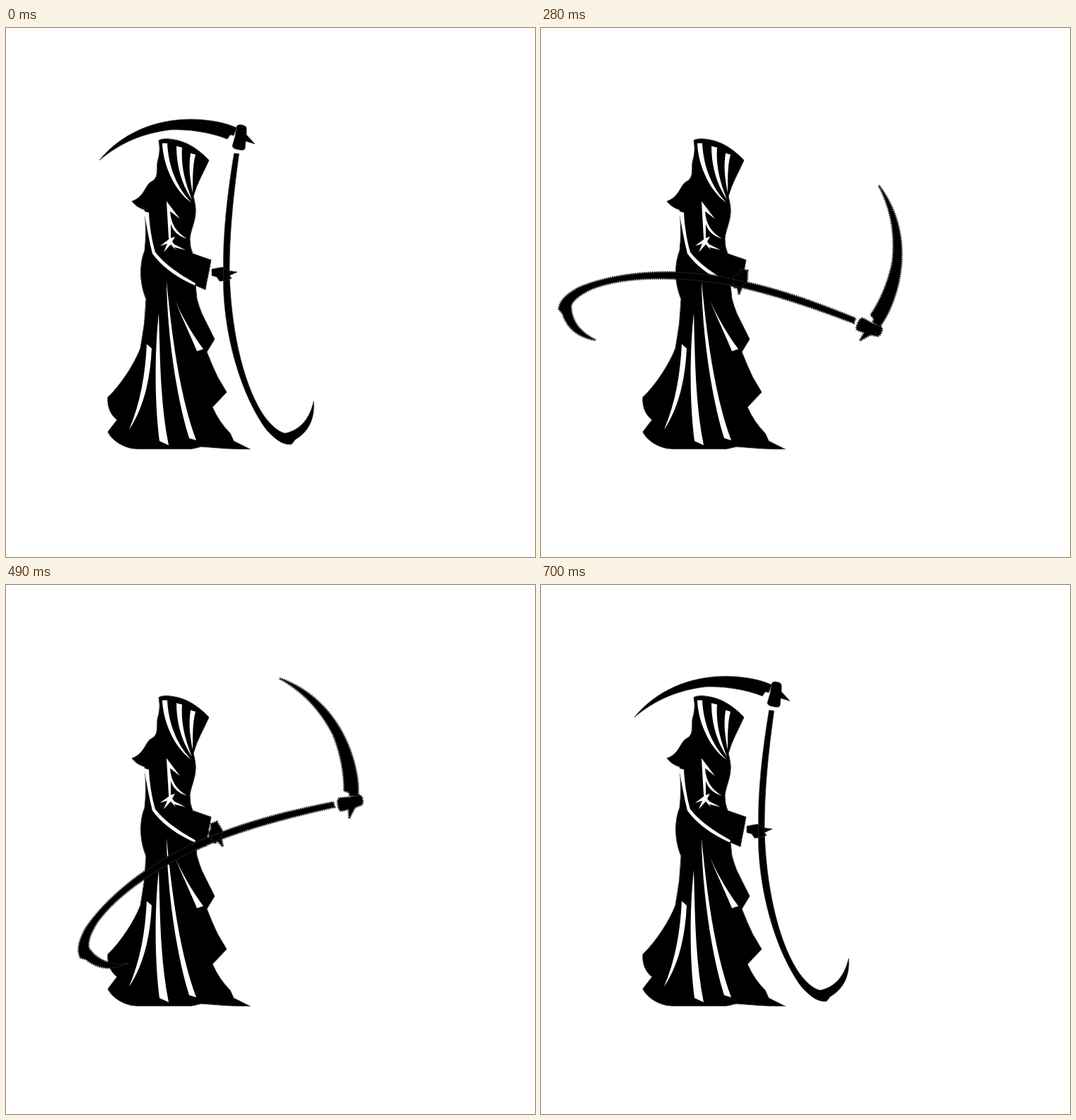
Recreate the animation shown at these times as an HTML page. Size 748 by 748 pixels, loop 770 ms.

```html
<!DOCTYPE html>
<html lang="en">
<head>
<meta charset="utf-8">
<title>Reaper swinging a scythe</title>
<style>
html, body { margin: 0; width: 100%; height: 100%; overflow: hidden; background: #fff; }
svg { display: block; width: 100vw; height: 100vh; }
.robe { stroke: #3a3a3a; stroke-width: 1; }
.folds { fill: #fff; }
.scythe {
  transform-origin: 283.5px 357.5px;
  stroke: #000;
  stroke-dasharray: 1.4 1.6;
  animation: swing 770ms step-end infinite;
}
.rim { fill: none; stroke: #333; stroke-width: .7; stroke-dasharray: none; }

/* the swing goes out in five steps and back through the same poses */
@keyframes swing {
  0%, 90.9%, 100% { transform: none; stroke-width: 0; }
  9.09%, 81.81% { transform: translate(-5.5px, -9px) rotate(23deg); stroke-width: 2; }
  18.18%, 72.72% { transform: translate(-4.5px, -16.5px) rotate(45deg); stroke-width: 2.5; }
  27.27%, 63.63% { transform: translate(-3.5px, -24px) rotate(69.6deg); stroke-width: 3; }
  36.36%, 54.54% { transform: translate(-6px, -25.5px) rotate(103deg); stroke-width: 3; }
  45.45% { transform: translate(-8px, -26.5px) rotate(136.1deg); stroke-width: 3.5; }
}
</style>
</head>
<body>
<svg viewBox="0 0 748 748">
  <defs>
    <clipPath id="ground"><rect width="748" height="595.5"/></clipPath>
    <g id="weapon">
      <!-- blade -->
      <path d="M132 187C163 149 210 129 262 129C287 129.500 308 133 326 141L322 152L317 151L313 157
        C287 147 257 143 232 144C193 149 162 162 132 187Z"/>
      <!-- socket and spike -->
      <path d="M326 140Q327 136 333 137Q340 138 340 142L340 151L352 164L339 160L338 170
        Q337 174 329 172Q321 171 320 167L324 153Z"/>
      <!-- handle -->
      <path d="M322.500 177L329.500 178C321 240 316 290 316 345C317.500 418 333 498 362 544
        C372 560 386 572 395 573C418 568 430 550 435 528C437 555 426 572 409 582L404 588.500
        C393 590 383 584 369 569C333 521 305 430 307.500 345C306.500 290 313 235 322.500 177Z"/>
      <!-- hand -->
      <path d="M291 341L301 339L308 338L313 343L327 345L316 350L319 354L311 357L302 358L298 352L291 350Z"/>
    </g>
  </defs>

  <g clip-path="url(#ground)">
    <path class="robe" d="M216 159C221 155 240 156 257 164Q273 172 287 187
      Q282 198 275 212Q269 224 265 238Q269 254 268 262C267 276 261 286 260 298
      Q260 310 264 319L290 328L282 370L268 364L270 383Q273 394 277 404L295 440L284 458
      Q291 476 299 493L312 515L292 536Q301 557 317 573L322 584L346 596
      Q322 596 302 594L276 592L262 595.500L187 595.500C168 595 150 584 144 571L157 554
      C146 546 143 532 144 522C163 504 182 474 190 453Q197 418 198 383
      C189 362 188 335 196 315Q199 290 196 257Q185 254 178 245
      C196 239 197 221 206 217C216 212 213 200 214 190Q218 176 217 167Z"/>
  </g>

  <g class="folds">
    <!-- hood -->
    <path d="M221 163C222 192 237 229 262 247C244 228 230 200 228 163Z"/>
    <path d="M241 167C241 196 249 222 263 243C254 220 247 197 249 169Z"/>
    <path d="M261 177C258 196 260 213 264 233C264 211 264 193 268 179Z"/>
    <!-- chest and sleeve -->
    <path d="M227 245L246 270L232 259C233 277 241 289 256 298C243 294 236 287 233 277L233 297L230 297Z"/>
    <path d="M231 294L233 297L239 295L235 302L238 306L254 314L238 310L240 314L233 306L223 317L228 305L218 308L230 299Z"/>
    <path d="M195 259L202 261C203 280 206 300 211 317C225 335 248 350 268 361L267 364
      C245 354 222 340 207 319C202 300 199 280 195 259Z"/>
    <path d="M290 331L289.500 344L285 356L283 369L287 357L290 350Z"/>
    <!-- skirt -->
    <path d="M239 385C248 406 262 431 279 454L270 457C262 437 248 408 239 385Z"/>
    <path d="M227 358C234 430 245 520 269 583L259 580C243 530 228 440 227 358Z"/>
    <path d="M216 403C218 470 218 530 230 590L217 584C210 530 210 460 216 403Z"/>
    <path d="M199 447L206 453C204 500 193 540 174 568C190 530 197 490 199 447Z"/>
  </g>

  <g class="scythe">
    <use href="#weapon"/>
    <use class="rim" href="#weapon"/>
  </g>
</svg>
</body>
</html>
```
